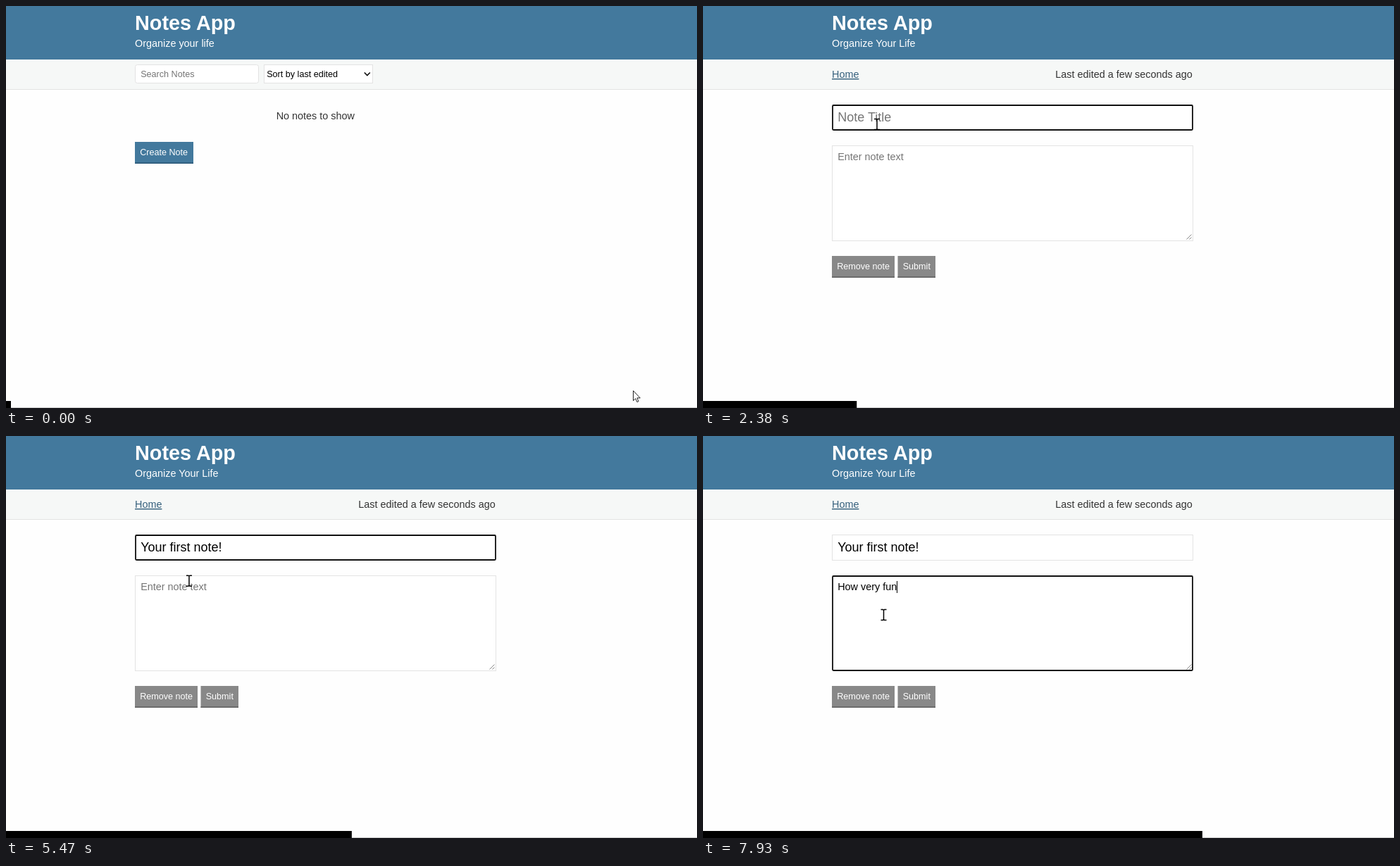
These frames come from a looping animation (981 px wide and 571 px high, 8 s). An HTML page:

```html
<!DOCTYPE html>
<html lang="en">
<head>
<meta charset="utf-8">
<title>Notes App</title>
<style>
  html, body { margin: 0; width: 100%; height: 100%; overflow: hidden; background: #fefefe; }
  svg { display: block; width: 100vw; height: 100vh; }
  text { font: 14.4px "Liberation Sans", Arial, sans-serif; fill: #333; white-space: pre; }
  .title { font-size: 28.8px; font-weight: bold; fill: #fff; }
  .white { fill: #fff; }
  .small { font-size: 12.6px; }
  .large { font-size: 18px; }
  .hint { fill: #757575; }
  .typed { fill: #000; }
  .link { fill: #35607d; text-decoration: underline; }
  .field { fill: #fff; stroke: #e3e3e3; }
  .ring { fill: none; stroke: #101010; stroke-width: 1.8; }
</style>
</head>
<body>
<svg viewBox="0 0 981 571">
  <rect width="981" height="571" fill="#fefefe"/>
  <rect width="981" height="76" fill="#43799d"/>
  <rect y="76" width="981" height="42" fill="#f6f8f7"/>
  <rect y="118" width="981" height="1" fill="#e3e3e3"/>
  <text class="title" x="183" y="34">Notes App</text>

  <g id="list">
    <text class="white" x="183" y="58">Organize your life</text>
    <rect class="field" x="183.5" y="83.5" width="175" height="26" rx="3"/>
    <text class="small hint" x="191.2" y="101">Search Notes</text>
    <rect class="field" x="366.5" y="83.5" width="154" height="26"/>
    <text class="small typed" x="370.2" y="101">Sort by last edited</text>
    <path d="M508.8 94.5l4 4 4-4" fill="none" stroke="#111" stroke-width="1.7"/>
    <text x="383.7" y="161">No notes to show</text>
    <rect x="183" y="193" width="83" height="31" fill="#43799d"/>
    <rect x="183" y="222" width="83" height="2" fill="#326080"/>
    <text class="small white" x="190.2" y="212">Create Note</text>
  </g>

  <g id="editor">
    <text class="white" x="183" y="58">Organize Your Life</text>
    <text class="link" x="183" y="102">Home</text>
    <text id="edited" x="500.3" y="102">Last edited a few seconds ago</text>
    <rect class="field" x="183.5" y="140.5" width="512" height="36"/>
    <text class="large" id="titleText" x="191.2" y="164"></text>
    <rect class="ring" id="titleRing" x="184" y="141" width="511" height="35" rx="1.5"/>
    <rect class="field" x="183.5" y="198.5" width="512" height="135"/>
    <path d="M686.5 331.5l7-7M690.5 331.5l3-3" fill="none" stroke="#888"/>
    <text id="bodyText" x="191.2" y="219"></text>
    <rect class="ring" id="bodyRing" x="184" y="199" width="511" height="134" rx="1.5"/>
    <rect id="caret" width="1" fill="#000"/>
    <rect x="183" y="355" width="89" height="31" fill="#888"/>
    <rect x="183" y="384" width="89" height="2" fill="#6b6b6b"/>
    <text class="small white" x="190.2" y="374">Remove note</text>
    <rect x="276.5" y="355" width="53.5" height="31" fill="#888"/>
    <rect x="276.5" y="384" width="53.5" height="2" fill="#6b6b6b"/>
    <text class="small white" x="283.7" y="374">Submit</text>
  </g>

  <rect y="570" width="981" height="1" fill="#cdcdcd"/>
  <rect id="bar" y="561" height="10"/>

  <g id="pointer">
    <path id="arrow" d="M.5 .5V14.6L3.7 11.6 5.9 16.5 8 15.6 5.9 10.8H10.3Z" fill="#fff" stroke="#222"/>
    <path id="hand" d="M-1.5 11V1.8Q-1.5 .5 0 .5T1.5 1.8V6Q3.3 5 4 6.6 5.6 5.8 6 7.4 7.5 7.2 7.5 8.8V13Q7.5 15.5 5.5 17.5V19H-1.2V17.5L-5.3 12.2Q-6 10.6 -4.6 10.3 -3.5 10 -1.5 12ZM1.5 6V9.5M4 6.6V9.8M6 7.4V10" fill="#fff" stroke="#222"/>
    <path id="beam" d="M-4 -7.5H-1L0 -6.5 1 -7.5H4M0 -6.5V6.5M-4 7.5H-1L0 6.5 1 7.5H4" fill="none" stroke="#000" stroke-width="1.5"/>
  </g>
</svg>
<script>
const LOOP = 8000;
const $ = id => document.getElementById(id);
const show = (id, on) => { $(id).style.display = on ? "" : "none"; };

// Screen refreshes: [time, refresh count], evenly spread between entries.
const pace = [[0, 0], [3470, 45], [4260, 56], [5180, 68], [5320, 69], [7930, 103]];
const ticks = [0];
for (let i = 1; i < pace.length; i++) {
  const [t0, n0] = pace[i - 1], [t1, n1] = pace[i];
  for (let n = n0 + 1; n <= n1; n++) ticks.push(t0 + (t1 - t0) * (n - n0) / (n1 - n0));
}

// Pointer track: [time, x, y]
const track = [
  [0, 890, 546], [70, 890, 546], [300, 640, 400], [500, 340, 255], [700, 238, 210],
  [900, 238, 210], [1350, 247, 168], [5250, 247, 168], [5470, 260, 205], [5700, 256.5, 254]
];

const fields = {
  title: {
    focus: 1450, blur: 5750, hint: "Note Title", text: "Your first note!", top: 148, height: 20,
    keys: [2680, 2840, 2920, 3070, 3300, 3460, 3540, 3610, 3690, 3840, 3920, 4100, 4250, 4330, 4430, 4580]
  },
  body: {
    focus: 5750, blur: Infinity, hint: "Enter note text", text: "How very fun", top: 206, height: 17,
    keys: [6220, 6380, 6540, 6700, 6920, 7000, 7090, 7170, 7320, 7470, 7620, 7770]
  }
};

function pointerAt(t) {
  const i = track.findIndex(k => k[0] > t);
  if (i < 0) return track[track.length - 1].slice(1);
  const [t0, x0, y0] = track[i - 1], [t1, x1, y1] = track[i];
  const p = (t - t0) / (t1 - t0);
  return [x0 + (x1 - x0) * p, y0 + (y1 - y0) * p];
}

function drawField(name, t) {
  const f = fields[name], node = $(name + "Text");
  const count = f.keys.filter(k => k <= t).length;
  const value = count ? f.text.slice(0, count) : f.hint;
  if (node.textContent !== value) node.textContent = value;
  node.classList.toggle("hint", !count);
  node.classList.toggle("typed", count > 0);

  const focused = t >= f.focus && t < f.blur;
  show(name + "Ring", focused);
  if (!focused) return;
  const since = count ? f.keys[count - 1] : f.focus;
  const caret = $("caret");
  show("caret", (t - since) % 1000 < 500);
  caret.setAttribute("x", Math.floor(191.2 + (count ? node.getComputedTextLength() : 0)));
  caret.setAttribute("y", f.top);
  caret.setAttribute("height", f.height);
}

function draw(time) {
  let n = ticks.length - 1;
  while (n > 0 && ticks[n] > time + 12) n--;
  const t = ticks[n];

  const editing = t >= 840;
  show("list", !editing);
  show("editor", editing);
  show("edited", t >= 900);
  show("caret", false);
  if (editing) {
    drawField("title", t);
    drawField("body", t);
  }

  const [x, y] = pointerAt(t);
  const betweenFields = y > 177 && y < 198;
  const kind = t < 640 ? "arrow" : t < 920 ? "hand" : betweenFields ? "arrow" : "beam";
  for (const k of ["arrow", "hand", "beam"]) show(k, k === kind);
  $("pointer").setAttribute("transform", `translate(${x} ${y})`);
  $("bar").setAttribute("width", 7 + n * 6.815);
}

const start = performance.now();
function loop() {
  draw((performance.now() - start) % LOOP);
  requestAnimationFrame(loop);
}
loop();
</script>
</body>
</html>
```
